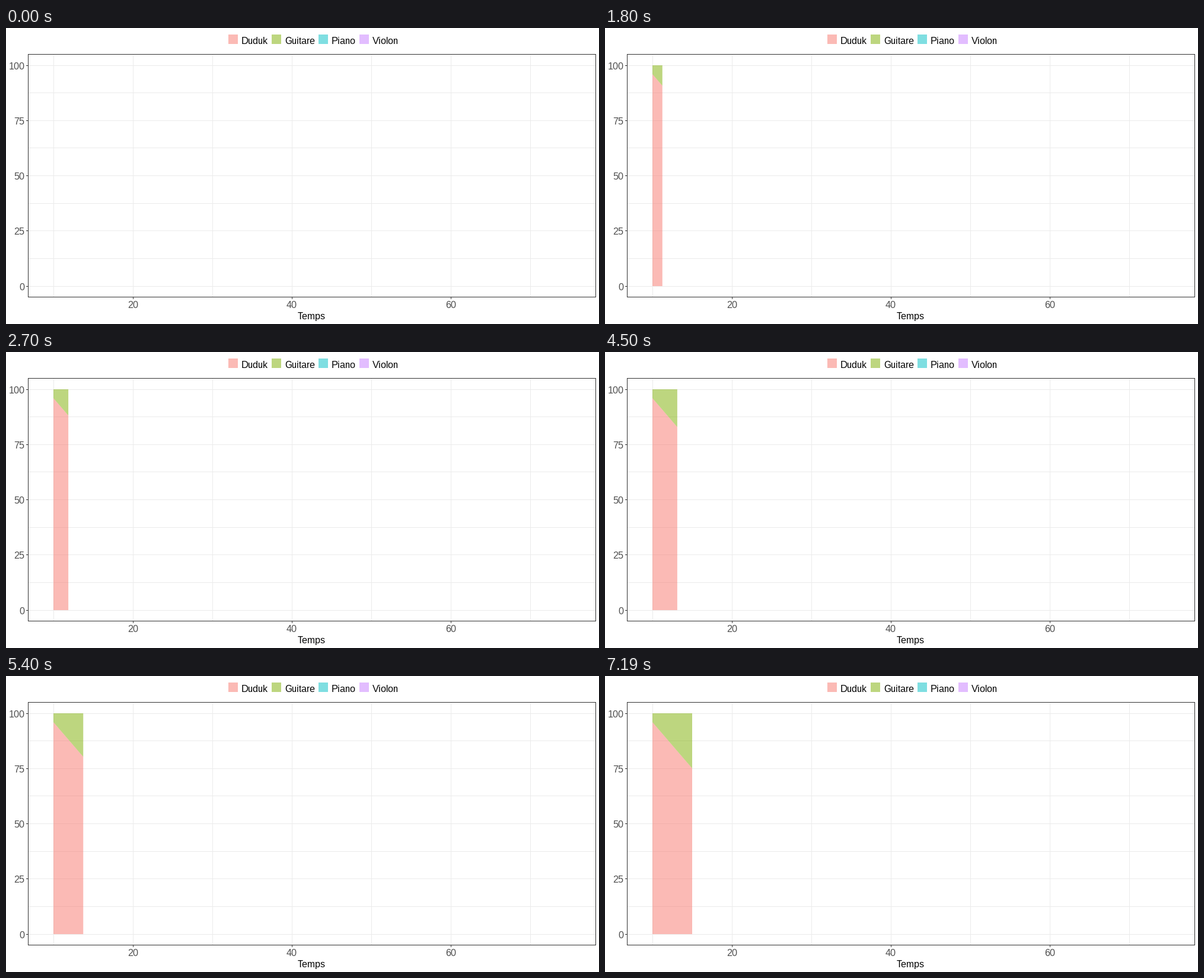
A matplotlib script for the animation above (8000 ms loop, 1000 by 500 pixels).

```python
import matplotlib.pyplot as plt
from matplotlib.animation import FuncAnimation
from matplotlib.patches import Polygon, Rectangle

plt.rcParams.update({
    "font.family": "Liberation Sans",
    "text.hinting": "native",
    "text.hinting_factor": 1,
    "toolbar": "None",
})

WIDTH, HEIGHT, DPI = 1000, 500, 100
LOOP_MS, INTERVAL = 8000, 50
STEPS, STEP_MS = 8, 898.75
FONT_SIZE = 16 * 72 / DPI

PINK, GREEN, CYAN, PURPLE = "#F8766D", "#7CAE00", "#00BFC4", "#C77CFF"
GRID, DARK, GREY = "#EBEBEB", "#333333", "#4D4D4D"

LEFT, TOP, RIGHT, BOTTOM = 37, 44, 994, 454
AREA_LEFT, AREA_RIGHT = 80, 147
AREA_TOP, AREA_BOTTOM = 63, 436
SPLIT_START, SPLIT_END = 78, 156

fig = plt.figure(figsize=(WIDTH / DPI, HEIGHT / DPI), dpi=DPI, facecolor="white")
ax = fig.add_axes([0, 0, 1, 1])
ax.set(xlim=(0, WIDTH), ylim=(HEIGHT, 0))
ax.axis("off")


def box(x, y, w, h, color, alpha=1):
    ax.add_patch(Rectangle((x, y), w, h, fc=color, lw=0, alpha=alpha,
                           antialiased=False))


def label(x, y, text, color="black", ha="left"):
    ax.text(x, y, text, color=color, ha=ha, va="baseline", fontsize=FONT_SIZE)


def area(color):
    patch = Polygon([(0, 0)] * 4, fc=color, lw=0, alpha=0.5, snap=False)
    return ax.add_patch(patch)


def x_pixel(value):
    return round(AREA_LEFT + (value - 10) * 13.4)


def y_pixel(value):
    return int(AREA_BOTTOM - value * 3.73)


# Grid
for value in range(10, 80, 10):
    box(x_pixel(value), TOP, 1, BOTTOM - TOP, GRID)
for i in range(9):
    box(LEFT, y_pixel(i * 12.5), RIGHT - LEFT, 1, GRID)

lower, upper = area(PINK), area(GREEN)

# Panel border, ticks and axis labels
for y in (TOP, BOTTOM):
    box(LEFT, y, RIGHT - LEFT + 1, 1, DARK)
for x in (LEFT, RIGHT):
    box(x, TOP, 1, BOTTOM - TOP + 1, DARK)
for value in range(0, 101, 25):
    y = y_pixel(value)
    box(LEFT - 3, y, 3, 1, DARK)
    label(31.5, y + 7, str(value), GREY, "right")
for value in (20, 40, 60):
    x = x_pixel(value)
    box(x, BOTTOM + 1, 1, 3, DARK)
    label(x, 473, str(value), GREY, "center")
label(515, 492, "Temps", ha="center")

# Legend
for x, name, color in ((375, "Duduk", PINK), (448, "Guitare", GREEN),
                       (527, "Piano", CYAN), (596, "Violon", PURPLE)):
    box(x, 11, 16, 16, color, 0.5)
    label(x + 22, 27, name)


def update(frame):
    # Each step is shown from the frame nearest below its start time.
    time = (frame + 1) * INTERVAL - 1
    progress = min(STEPS, int(time / STEP_MS)) / STEPS
    right = AREA_LEFT + progress * (AREA_RIGHT - AREA_LEFT)
    split = SPLIT_START + progress * (SPLIT_END - SPLIT_START)
    lower.set_xy([(AREA_LEFT, SPLIT_START), (right, split),
                  (right, AREA_BOTTOM), (AREA_LEFT, AREA_BOTTOM)])
    upper.set_xy([(AREA_LEFT, AREA_TOP), (right, AREA_TOP),
                  (right, split), (AREA_LEFT, SPLIT_START)])
    for patch in (lower, upper):
        patch.set_visible(progress > 0)
    return lower, upper


animation = FuncAnimation(fig, update, frames=LOOP_MS // INTERVAL,
                          interval=INTERVAL, repeat=True, repeat_delay=0)
plt.show()
```
